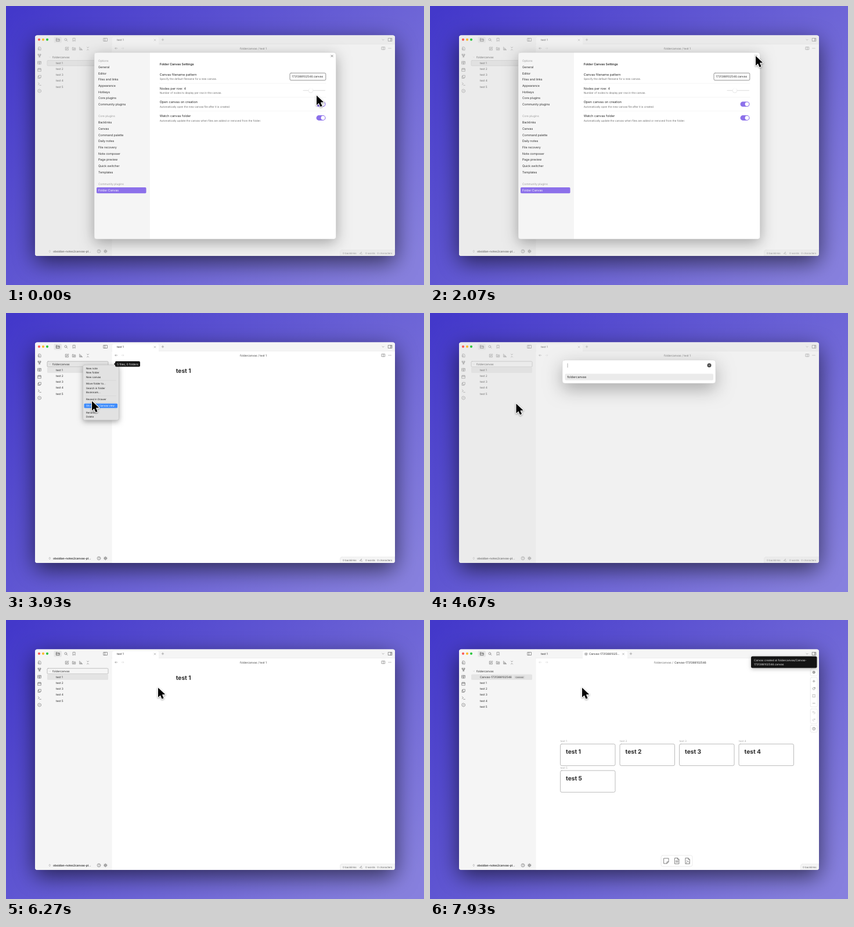
Write an HTML page with a canvas that moves like this. It is 720x480 px and loops after 8 s.

```html
<!DOCTYPE html>
<html lang="en">
<head>
<meta charset="utf-8">
<title>Folder canvas demo</title>
<style>
html, body { margin: 0; width: 100%; height: 100%; overflow: hidden; background: #5a50d0; }
canvas { display: block; width: 720px; height: 480px; }
</style>
</head>
<body>
<canvas id="stage"></canvas>
<script>
const LOOP = 8000;
const canvas = document.getElementById('stage');
const ctx = canvas.getContext('2d');
const dpr = window.devicePixelRatio || 1;
canvas.width = 720 * dpr;
canvas.height = 480 * dpr;

const INK = '#2a2a2a', MUTED = '#666', FAINT = '#aaa', PANEL = '#f5f5f5', ACCENT = '#8c70ea';

const T = {
  closeSettings: 2130, hoverFolder: 2800, openMenu: 3300, closeMenu: 4300,
  openPicker: 4400, closePicker: 6000, createCanvas: 6450
};

// time, x, y of the pointer tip
const POINTER = [
  [0, 535, 154], [350, 535, 154], [1100, 527.5, 149.5], [1450, 527.5, 149.5],
  [2000, 561, 86], [2150, 561, 86], [2850, 138.5, 100.5], [3000, 138.5, 100.5],
  [3250, 133, 89], [3400, 133, 89], [3850, 148, 151.5], [4350, 148, 151.5],
  [5000, 149, 160.5], [5450, 149, 160.5], [5900, 262, 116.5], [LOOP, 262, 116.5]
];

const ICONS = {
  folder: 'M3 19V5h6l3 3h9v11zM3 12h18',
  search: 'M17 11a6.500 6.500 0 1 1-13 0a6.500 6.500 0 1 1 13 0M16 16l5 5',
  bookmark: 'M6 3h12v18l-6-5-6 5z',
  panelLeft: 'M2 4h20v16H2zM9 4v16',
  panelRight: 'M2 4h20v16H2zM15 4v16M18 8h1M18 12h1',
  openFile: 'M6 10V3h10l4 4v14H6v-4M2 14h9M8 11l3 3-3 3',
  fork: 'M4 3h5v5H4zM15 3h5v5h-5zM10 16h5v5h-5zM6 8v4h12V8M12 12v4',
  grid: 'M3 4h18v16H3zM3 11h9v9M12 4v16M16 9h5',
  calendar: 'M3 5h18v16H3zM3 10h18M8 2v5M16 2v5',
  copy: 'M8 3h13v13H8zM8 8H3v13h13v-5',
  terminal: 'M4 5l7 6-7 6M12 20h9',
  tag: 'M12 2l9 5v10l-9 5-9-5V7zM12 9v5',
  edit: 'M12 4H3v17h17v-9M9 15l1-4 9-9 3 3-9 9z',
  newFolder: 'M3 19V5h6l3 3h9v11zM12 11v6M9 14h6',
  sort: 'M4 3v17h17M9 8h2M9 13h6M9 17h9',
  collapse: 'M7 3l5 5 5-5M7 21l5-5 5 5',
  updown: 'M7 9l5-6 5 6M7 15l5 6 5-6',
  back: 'M21 12H4M10 6l-6 6 6 6',
  forward: 'M3 12h17M14 6l6 6-6 6',
  down: 'M5 9l7 7 7-7',
  book: 'M2 4h20v16H2zM12 4v16',
  dots: 'M4 12h2M11 12h2M18 12h2',
  plus: 'M12 4v16M4 12h16',
  minus: 'M4 12h16',
  cross: 'M5 5l14 14M19 5L5 19',
  help: 'M22 12a10 10 0 1 1-20 0a10 10 0 1 1 20 0M9 9q1-3 4-2t1 4l-2 2M12 17h.5',
  gear: 'M19 12a7 7 0 1 1-14 0a7 7 0 1 1 14 0M15 12a3 3 0 1 1-6 0a3 3 0 1 1 6 0M12 2v3M12 19v3M2 12h3M19 12h3M5 5l2 2M17 17l2 2M19 5l-2 2M5 19l2-2',
  refresh: 'M20 12a8 8 0 1 1-3-6l3 3M20 3v6h-6',
  expand: 'M9 4H4v5M15 4h5v5M9 20H4v-5M15 20h5v-5',
  undo: 'M8 4L4 8l4 4M4 8h10a6 6 0 0 1 0 12h-3',
  redo: 'M16 4l4 4-4 4M20 8H10a6 6 0 0 0 0 12h3',
  card: 'M4 3h16v12l-6 6H4zM20 15h-6v6',
  page: 'M5 2h9l5 5v15H5zM14 2v5h5M8 12h8M8 16h8',
  image: 'M5 2h9l5 5v15H5zM14 2v5h5M7 19l6-6 5 5M9 11h1',
  pencil: 'M4 17l11-12 3 3L7 19H4zM12 21h10'
};
for (const name in ICONS) ICONS[name] = new Path2D(ICONS[name]);

function icon(name, x, y, color = MUTED, size = 7, weight = 2.1) {
  ctx.save();
  ctx.translate(x - size / 2, y - size / 2);
  ctx.scale(size / 24, size / 24);
  ctx.lineWidth = weight;
  ctx.strokeStyle = color;
  ctx.stroke(ICONS[name]);
  ctx.restore();
}

// y is the vertical centre of the capitals
function text(str, x, y, size = 4.85, color = INK, weight = 400, align = 'left') {
  ctx.font = `${weight} ${size}px Inter, sans-serif`;
  ctx.textAlign = align;
  ctx.fillStyle = color;
  ctx.fillText(str, x, y + size * 0.36);
}

function box(x, y, w, h, r, fill, stroke, lineWidth = 0.7) {
  ctx.beginPath();
  ctx.roundRect(x, y, w, h, r);
  if (fill) { ctx.fillStyle = fill; ctx.fill(); }
  if (stroke) { ctx.strokeStyle = stroke; ctx.lineWidth = lineWidth; ctx.stroke(); }
}

function shadowBox(x, y, w, h, r, fill, blur, dy, alpha) {
  ctx.save();
  ctx.shadowColor = `rgba(0,0,0,${alpha})`;
  ctx.shadowBlur = blur * dpr;
  ctx.shadowOffsetY = dy * dpr;
  box(x, y, w, h, r, fill);
  ctx.restore();
}

function disc(x, y, r, fill) {
  ctx.beginPath();
  ctx.arc(x, y, r, 0, 2 * Math.PI);
  ctx.fillStyle = fill;
  ctx.fill();
}

function line(x1, y1, x2, y2, color, width = 0.6) {
  ctx.beginPath();
  ctx.moveTo(x1, y1);
  ctx.lineTo(x2, y2);
  ctx.strokeStyle = color;
  ctx.lineWidth = width;
  ctx.stroke();
}

function pointerAt(t) {
  const i = POINTER.findIndex(k => k[0] > t);
  const [t0, x0, y0] = POINTER[i - 1], [t1, x1, y1] = POINTER[i];
  const p = (t - t0) / (t1 - t0), e = p * p * (3 - 2 * p);
  return { x: x0 + (x1 - x0) * e, y: y0 + (y1 - y0) * e };
}

function drawPointer({ x, y }) {
  ctx.save();
  ctx.translate(x, y);
  ctx.shadowColor = 'rgba(0,0,0,.4)';
  ctx.shadowBlur = 3 * dpr;
  ctx.shadowOffsetY = dpr;
  ctx.beginPath();
  [[0, 0], [0, 16.5], [3.8, 13], [6.6, 19.2], [9.6, 17.9], [6.9, 11.8], [12.2, 11.6]]
    .forEach(p => ctx.lineTo(...p));
  ctx.closePath();
  ctx.strokeStyle = '#fff';
  ctx.lineWidth = 2.2;
  ctx.stroke();
  ctx.shadowColor = 'transparent';
  ctx.fillStyle = '#000';
  ctx.fill();
  ctx.restore();
}

function drawBackdrop() {
  const g = ctx.createLinearGradient(60, -40, 620, 520);
  g.addColorStop(0, '#4338ca');
  g.addColorStop(1, '#8780de');
  ctx.fillStyle = g;
  ctx.fillRect(0, 0, 720, 480);
  shadowBox(50, 50.5, 620, 379.5, 4, '#fff', 38, 11, 0.6);
}

function drawSidebar(t, created) {
  ctx.fillStyle = PANEL;
  ctx.fillRect(50, 50, 132.5, 380);
  ctx.fillRect(182, 50, 488, 15.5);
  box(82.5, 53, 13.5, 10.5, 2, '#e6e6e6');
  icon('folder', 89.3, 58, '#444', 7.5);
  icon('search', 103.3, 58);
  icon('bookmark', 117.3, 58);
  icon('panelLeft', 171.3, 58, MUTED, 7.5);
  ['openFile', 'fork', 'grid', 'calendar', 'copy', 'terminal', 'tag']
    .forEach((name, i) => icon(name, 57.7, 73.3 + i * 12.15));
  ['edit', 'newFolder', 'sort', 'collapse'].forEach((name, i) => icon(name, 105 + i * 12, 73.3));

  const hovered = t >= T.hoverFolder && t < T.openPicker;
  const outlined = t >= T.openMenu && !created;
  if (hovered || outlined) {
    box(71, 83.2, 105, 9.6, 1.5, hovered && '#e5e5e5', outlined && '#a9a9a9');
  }
  icon('down', 75.5, 88, FAINT, 4);
  text('foldercanvas', 80, 88);
  box(71, 93.5, 105, 9.4, 1.5, '#e4e4e4', t < T.openMenu && '#c4c4c4');
  if (created) {
    text('Canvas-1731388102546', 86, 98.2);
    box(145, 95.8, 18.5, 5, 1, '#d9d9d9');
    text('CANVAS', 154.2, 98.3, 3.4, '#555', 500, 'center');
  }
  for (let i = 0; i < 5; i++) text('test ' + (i + 1), 86, 98.2 + (i + created) * 10.15);

  icon('updown', 75.3, 422, MUTED, 5);
  text('obsidian-notes2canvas-pl...', 81, 422, 4.8, INK, 600);
  icon('help', 160, 422);
  icon('gear', 171.3, 422);
}

function drawHeader(created) {
  line(182, 65.5, 670, 65.5, '#e6e6e6');
  if (created) {
    box(263, 53.5, 77, 13, [3, 3, 0, 0], '#fff');
    icon('grid', 269, 58.5, MUTED, 5);
    text('Canvas-17313881025...', 274, 58.5);
    icon('cross', 333, 58.5, MUTED, 5);
  } else {
    box(183, 53.5, 80, 13, [3, 3, 0, 0], '#fff');
    icon('cross', 256.5, 58.5, MUTED, 5);
  }
  text('test 1', 191, 58.5);
  icon('plus', created ? 346 : 270, 58, MUTED, 5.5);
  icon('down', 649.5, 58, MUTED, 5.5);
  icon('panelRight', 661.7, 58, MUTED, 7.5);
  icon('back', 189.7, 72.8, created ? '#ccc' : MUTED, 5.5);
  icon('forward', 201, 72.8, '#ccc', 5.5);
  if (created) {
    text('foldercanvas /', 386, 72.8, 4.85, MUTED);
    text('Canvas-1731388102546', 421, 72.8);
  } else {
    text('foldercanvas / test 1', 403, 72.8, 4.85, '#444');
  }
  icon('book', 650, 72.8, MUTED, 6.5);
  icon('dots', 661, 72.8, MUTED, 6.5);
}

function drawStatus(created) {
  const left = created ? 638.5 : 575.5;
  box(left, 419.8, 670 - left, 10.5, [3, 0, 4, 0], PANEL, '#e0e0e0', 0.5);
  if (created) return text('0 backlinks', 642, 425, 4.4, MUTED);
  text('0 backlinks', 580, 425, 4.4, MUTED);
  icon('pencil', 611.5, 424.7, MUTED, 5.5);
  text('0 words', 619, 425, 4.4, MUTED);
  text('0 characters', 639.2, 425, 4.4, MUTED);
}

function drawCanvasView() {
  for (let i = 0; i < 5; i++) {
    const x = 224.5 + (i % 4) * 102.5, y = 213.3 + (i > 3) * 45.7;
    text('test ' + (i + 1), x, y - 5, 4.7, FAINT);
    box(x, y, 94.5, 37.3, 2.5, '#fff', '#aaa', 0.8);
    text('test ' + (i + 1), x + 9.5, y + 13.5, 10.2, INK, 700);
  }
  const groups = [[84, 12, ['gear']], [99, 50.5, ['plus', 'refresh', 'expand', 'minus']],
    [153, 25, ['undo', 'redo']], [181, 12, ['help']]];
  for (const [y, h, names] of groups) {
    box(655.2, y, 12, h, 2, '#fff', '#e2e2e2');
    names.forEach((name, i) =>
      icon(name, 661.2, y + h * (i + 0.5) / names.length, h === 25 ? FAINT : MUTED, 6));
  }
  box(398, 405, 54, 19, 3, '#fff', '#e2e2e2');
  ['card', 'page', 'image'].forEach((name, i) => icon(name, 407 + i * 18.4, 414.5, MUTED, 12, 1.6));
  shadowBox(553, 62.5, 113.5, 20, 2.5, '#141414', 6, 2, 0.25);
  text('Canvas created at foldercanvas/Canvas-', 558, 69.5, 4.7, '#eee');
  text('1731388102546.canvas', 558, 76, 4.7, '#eee');
}

function dimWindow() {
  box(50, 50.5, 620, 379.5, 4, 'rgba(220,220,220,.4)');
}

function toggle(y) {
  box(534.5, y - 4.4, 16, 8.8, 4.4, ACCENT);
  disc(546, y, 3.4, '#fff');
}

function drawSettings(t) {
  dimWindow();
  shadowBox(152, 80, 416.5, 321, 4, '#fff', 24, 6, 0.33);
  box(152, 80, 96, 321, [4, 0, 0, 4], PANEL);
  box(152, 80, 416.5, 321, 4, null, '#c8c8c8', 0.5);
  icon('cross', 561.5, 86, INK, 6);

  const sections = [
    ['Options', 94.2, ['General', 'Editor', 'Files and links', 'Appearance', 'Hotkeys',
      'Core plugins', 'Community plugins']],
    ['Core plugins', 189.3, ['Backlinks', 'Canvas', 'Command palette', 'Daily notes', 'File recovery',
      'Note composer', 'Page preview', 'Quick switcher', 'Templates']],
    ['Community plugins', 306, ['Folder Canvas']]
  ];
  box(156, 312, 85.5, 10.2, 1.7, ACCENT);
  for (const [title, y, items] of sections) {
    text(title, 159, y, 4.8, '#999');
    items.forEach((item, i) =>
      text(item, 159, y + 11 + i * 10.68, 5.2, item === 'Folder Canvas' ? '#fff' : INK));
  }

  text('Folder Canvas Settings', 264.7, 100.3, 5.3, INK, 600);
  const rows = [
    ['Canvas filename pattern', 'Specify the default filename for a new canvas.'],
    ['Nodes per row: 4', 'Number of nodes to display per row in the canvas.'],
    ['Open canvas on creation', 'Automatically open the new canvas file after it is created.'],
    ['Watch canvas folder', 'Automatically update the canvas when files are added or removed from the folder.']
  ];
  rows.forEach(([label, note], i) => {
    const y = 117.8 + i * 23.75;
    text(label, 264.7, y, 5.55);
    text(note, 264.7, y + 8, 4.5, MUTED);
    if (i) line(264.7, y - 8.3, 551, y - 8.3, '#efefef');
  });
  box(489, 115.3, 61.8, 12.5, 2, '#fff', '#888', 0.9);
  text('1731388102546.canvas', 492.5, 121.7, 4.9);
  if (t > 170 && (t - 170) % 1060 < 530) line(547.8, 118.5, 547.8, 125, INK, 0.6);
  line(512, 145.3, 549.5, 145.3, '#ddd', 1);
  disc(525, 145.6, 3.9, '#ddd');
  disc(525, 145.3, 3.5, '#fff');
  toggle(168.8);
  toggle(192.5);
}

function drawMenu(pointer) {
  const items = [['New note', 95], ['New folder', 102.5], ['New canvas', 110],
    ['Move folder to...', 121.5], ['Search in folder', 129], ['Bookmark...', 136.6],
    ['Reveal in Drawer', 148.2], ['Show files Canvas view', 159.6], ['Rename...', 171], ['Delete', 178.6]];
  shadowBox(132.5, 89.3, 62, 95, 3, '#e2e2e2', 10, 3, 0.35);
  box(132.5, 89.3, 62, 95, 3, null, '#bbb', 0.5);
  [115.8, 142.4, 153.8, 165.3].forEach(y => line(137.5, y, 189.5, y, '#cfcfcf', 0.5));
  const hotY = pointer.y + (pointer.y > 150 ? 8 : 0);
  for (const [label, y] of items) {
    const hot = Math.abs(hotY - y) < 3.8;
    if (hot) box(134.5, y - 3.9, 57.5, 7.8, 1.5, '#3f8cfb');
    text(label, 138, y, 4.4, hot ? '#fff' : '#1c1c1c');
  }
  box(188, 83, 43, 9.6, 2, '#171717');
  ctx.beginPath();
  ctx.moveTo(185.8, 87.8);
  ctx.lineTo(188.4, 85.6);
  ctx.lineTo(188.4, 90);
  ctx.fill();
  text('5 files, 0 folders', 209.5, 87.8, 4.8, '#eee', 400, 'center');
}

function drawPicker(t) {
  dimWindow();
  shadowBox(228, 81, 264, 40, 4, '#fff', 30, 10, 0.3);
  box(228, 81, 264, 40, 4, null, '#ccc', 0.5);
  if ((t - T.openPicker) % 1000 < 500) line(237, 87, 237, 93.5, '#777', 0.6);
  disc(481, 90, 3.5, '#4a4a4a');
  icon('cross', 481, 90, '#fff', 3.4, 3);
  box(232.5, 104.5, 255.5, 11.3, 2, '#ebebeb');
  text('foldercanvas', 236.5, 110.2, 5.4);
}

function draw(t) {
  const created = t >= T.createCanvas;
  const pointer = pointerAt(t);
  ctx.setTransform(dpr, 0, 0, dpr, 0, 0);
  ctx.textRendering = 'geometricPrecision';
  ctx.lineCap = ctx.lineJoin = 'round';
  drawBackdrop();
  ctx.save();
  ctx.beginPath();
  ctx.roundRect(50, 50.5, 620, 379.5, 4);
  ctx.clip();
  drawSidebar(t, created);
  drawHeader(created);
  drawStatus(created);
  if (created) drawCanvasView();
  else text('test 1', 292.7, 99, 10.2, INK, 700);
  if (t < T.closeSettings) drawSettings(t);
  if (t >= T.openMenu && t < T.closeMenu) drawMenu(pointer);
  if (t >= T.openPicker && t < T.closePicker) drawPicker(t);
  ['#fb5a55', '#fbbb2e', '#2cc740'].forEach((c, i) => disc(57 + i * 7, 57.8, 2.1, c));
  ctx.restore();
  drawPointer(pointer);
}

const start = performance.now();
function tick() {
  draw((performance.now() - start) % LOOP);
  requestAnimationFrame(tick);
}
tick();
</script>
</body>
</html>
```
